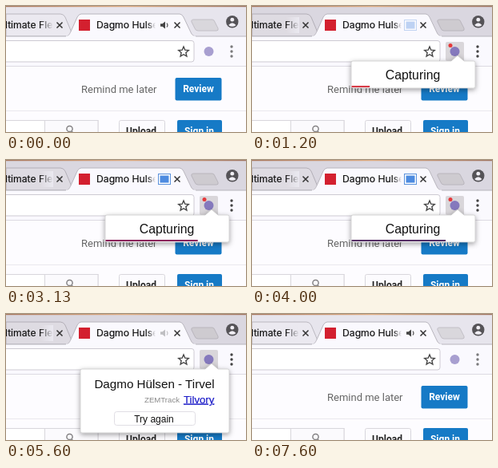
An HTML page that plays this animation: 300 by 158 pixels, repeating every 7670 ms.

```html
<!DOCTYPE html>
<html lang="en">
<head>
<meta charset="utf-8">
<title>Capturing a song</title>
<style>
html, body { margin: 0; width: 100%; height: 100%; overflow: hidden; background: #fff; }
svg { display: block; width: 100vw; height: 100vh; }
text { font-family: "Liberation Sans", Arial, sans-serif; }
.tab { font: 12.2px Inter, "Open Sans", sans-serif; fill: #111; stroke: #111; stroke-width: .2px; }
.page { font: 13px Roboto, Arial, sans-serif; fill: #666; }
.label { font: bold 12px Roboto, Arial, sans-serif; text-anchor: middle; }
.mid { text-anchor: middle; }
.open, .capture, .result, .idle, .speaker, .screen, .bar { animation: 7.67s linear infinite; }
.open { animation-name: open; animation-timing-function: step-end; }
.idle { animation-name: idle; animation-timing-function: step-end; }
.capture { animation-name: capture; animation-timing-function: step-end; }
.result { animation-name: result; animation-timing-function: step-end; }
.speaker { animation-name: speaker; }
.screen { animation-name: screen; }
.bar { animation-name: bar; transform-box: fill-box; transform-origin: left; }
@keyframes open { 0%, 94.7% { opacity: 0 } 9.55% { opacity: 1 } 100% { opacity: 0 } }
@keyframes idle { 0%, 94.7% { opacity: .7 } 9.55% { opacity: 1 } 100% { opacity: .7 } }
@keyframes capture { 0% { opacity: 0 } 9.55% { opacity: 1 } 72.1%, 100% { opacity: 0 } }
@keyframes result { 0% { opacity: 0 } 72.1% { opacity: 1 } 94.7%, 100% { opacity: 0 } }
@keyframes speaker { 0%, 10.4% { opacity: 1 } 14.3%, 72.1% { opacity: 0 } 75%, 100% { opacity: 1 } }
@keyframes screen { 0%, 13% { opacity: 0 } 15.65% { opacity: .35 } 19%, 70% { opacity: 1 } 73%, 100% { opacity: 0 } }
@keyframes bar {
  0%, 10.4% { transform: scaleX(0); fill: #e23b3b }
  15.65% { transform: scaleX(.19); fill: #d6333f }
  26.08% { transform: scaleX(.575); fill: #a3249c }
  40.8% { transform: scaleX(.96); fill: #8c1f5c }
  63.5%, 100% { transform: scaleX(1); fill: #203f70 }
}
</style>
</head>
<body>
<svg viewBox="0 0 300 158" preserveAspectRatio="none">
  <defs>
    <linearGradient id="desk">
      <stop offset="0" stop-color="#a8765c"/>
      <stop offset=".5" stop-color="#e0ac80"/>
      <stop offset="1" stop-color="#a07460"/>
    </linearGradient>
    <linearGradient id="fade">
      <stop offset="0" stop-color="#ebe9f0" stop-opacity="0"/>
      <stop offset="1" stop-color="#ebe9f0"/>
    </linearGradient>
    <linearGradient id="fadeActive">
      <stop offset="0" stop-color="#faf9fe" stop-opacity="0"/>
      <stop offset="1" stop-color="#faf9fe"/>
    </linearGradient>
    <filter id="shadow" x="-20%" y="-20%" width="140%" height="150%">
      <feDropShadow dx="0" dy="2" stdDeviation="3" flood-opacity=".38"/>
    </filter>
    <path id="cross" d="M-3.5-3.5 3.5 3.5M3.5-3.5-3.5 3.5" stroke="#333" stroke-width="1.5"/>
    <clipPath id="title"><rect x="110" y="10" width="77" height="27"/></clipPath>
  </defs>

  <!-- tab strip -->
  <rect width="300" height="158" fill="#fdfcff"/>
  <rect width="300" height="38" fill="#e7e5ed"/>
  <path d="M0 10H68Q72 10 74 14L82 33Q84 38 88 38H0Z" fill="#ebe9f0" stroke="#bbb8c0"/>
  <path d="M235 17H258Q260 17 261 20L265 28Q266 31 263 31H240Q237 31 236 28L232 20Q231 17 235 17Z" fill="#d9d7dc" stroke="#c2bfc6"/>
  <rect class="open" width="300" height="38" fill="#56505e" fill-opacity=".09"/>
  <rect width="300" height="1.2" fill="url(#desk)"/>
  <text class="tab" x="-1" y="28">ltimate Fle</text>
  <rect x="42" y="14" width="17" height="20" fill="url(#fade)"/>
  <use href="#cross" x="67" y="24"/>
  <rect y="38" width="300" height="38" fill="#faf9fe"/>
  <path d="M0 38H74C78 38 79 36 81 32L89 14Q91 10 94 10H217Q220 10 222 14L231 33Q233 38 238 38H300" fill="#faf9fe" stroke="#b8b5bd"/>
  <path d="M75 38.5H237" stroke="#faf9fe" stroke-width="2"/>
  <rect x="91" y="17" width="14" height="14" fill="#d3202f"/>
  <text class="tab" x="113" y="28" clip-path="url(#title)">Dagmo Hulse</text>
  <rect x="176" y="14" width="11" height="20" fill="url(#fadeActive)"/>
  <g class="speaker">
    <path d="M193 22.3H195.5L199 19.5V28.5L195.5 25.7H193Z" fill="#444"/>
    <path d="M201 21.5Q203 24 201 26.5" fill="none" stroke="#555" stroke-width="1.2"/>
  </g>
  <g class="screen">
    <rect x="190.5" y="17.5" width="15" height="13" fill="#fff" stroke="#5a91dc"/>
    <rect x="192.5" y="19.5" width="11" height="9" fill="#4d8be0"/>
  </g>
  <use href="#cross" x="214" y="24"/>
  <circle cx="282.8" cy="19.7" r="7.7" fill="#555357"/>
  <circle cx="282.8" cy="17.2" r="2.4" fill="#f0eef4"/>
  <path d="M278.1 23.9Q282.8 18.7 287.5 23.9Q282.8 27.7 278.1 23.9" fill="#f0eef4"/>

  <!-- toolbar -->
  <rect x="-6" y="43.5" width="241" height="26.5" rx="3" fill="#fff" stroke="#cdcad2"/>
  <path d="M222 51 223.8 55.2 228.3 55.6 224.9 58.6 225.9 63 222 60.7 218.1 63 219.1 58.6 215.7 55.6 220.2 55.2Z" fill="none" stroke="#444" stroke-width="1.4"/>
  <rect class="open" x="242" y="45" width="23" height="24" rx="2" fill="#d9d6da"/>
  <circle class="idle" cx="253.5" cy="57" r="6" fill="#8579bd"/>
  <circle class="capture" cx="248" cy="49.5" r="2.5" fill="#e5383b"/>
  <g class="idle" fill="#444">
    <circle cx="282" cy="51" r="1.7"/><circle cx="282" cy="57" r="1.7"/><circle cx="282" cy="63" r="1.7"/>
  </g>
  <path d="M0 75.5H300" stroke="#dddae2"/>

  <!-- page -->
  <text class="page" x="94" y="108.5">Remind me later</text>
  <rect x="211.5" y="90" width="58" height="28.5" rx="2" fill="#167ac6"/>
  <text class="label" x="240.5" y="108" fill="#fff">Review</text>
  <path d="M0 131.5H300" stroke="#eae8ee"/>
  <rect x="-5" y="143.5" width="120" height="26" fill="#fff" stroke="#d8d6dc"/>
  <rect x="48.5" y="143.5" width="66.5" height="26" fill="#fbfafd" stroke="#d8d6dc"/>
  <g fill="none" stroke="#858385" stroke-width="1.5">
    <circle cx="79.5" cy="154" r="3.6"/><path d="M82 157 86 161"/>
  </g>
  <rect x="141.5" y="143.5" width="57" height="26" rx="2" fill="#fcfbfe" stroke="#d8d6dc"/>
  <text class="label" x="169" y="161" fill="#222">Upload</text>
  <rect x="214" y="143" width="56" height="27" rx="2" fill="#167ac6"/>
  <text class="label" x="241.5" y="161" fill="#fff">Sign in</text>

  <!-- popups -->
  <g class="capture">
    <path d="M126 69H249L257 62 265 69H277Q279 69 279 71V101Q279 103 277 103H126Q124 103 124 101V71Q124 69 126 69Z" fill="#fff" stroke="#bbb" stroke-width=".6" filter="url(#shadow)"/>
    <text class="mid" x="201" y="92" font-size="15.8" fill="#111">Capturing</text>
    <rect class="bar" x="124.5" y="100" width="120" height="2"/>
  </g>
  <g class="result">
    <path d="M95 69H249L257 62 265 69H277Q279 69 279 71V147Q279 149 277 149H95Q93 149 93 147V71Q93 69 95 69Z" fill="#fff" stroke="#bbb" stroke-width=".6" filter="url(#shadow)"/>
    <text class="mid" x="185.5" y="93" font-size="15.2" fill="#111">Dagmo Hülsen - Tirvel</text>
    <text x="217" y="111" font-size="9.6" fill="#888" text-anchor="end">ZEMTrack</text>
    <text x="222" y="111.5" font-size="13.2" fill="#1a1ac8" stroke="#1a1ac8" stroke-width=".2" text-decoration="underline">Tilvory</text>
    <rect x="135.5" y="122.5" width="101" height="17" rx="3" fill="#fff" stroke="#e0dee4"/>
    <text class="mid" x="185" y="135.5" font-size="12" fill="#111">Try again</text>
  </g>
</svg>
</body>
</html>
```
